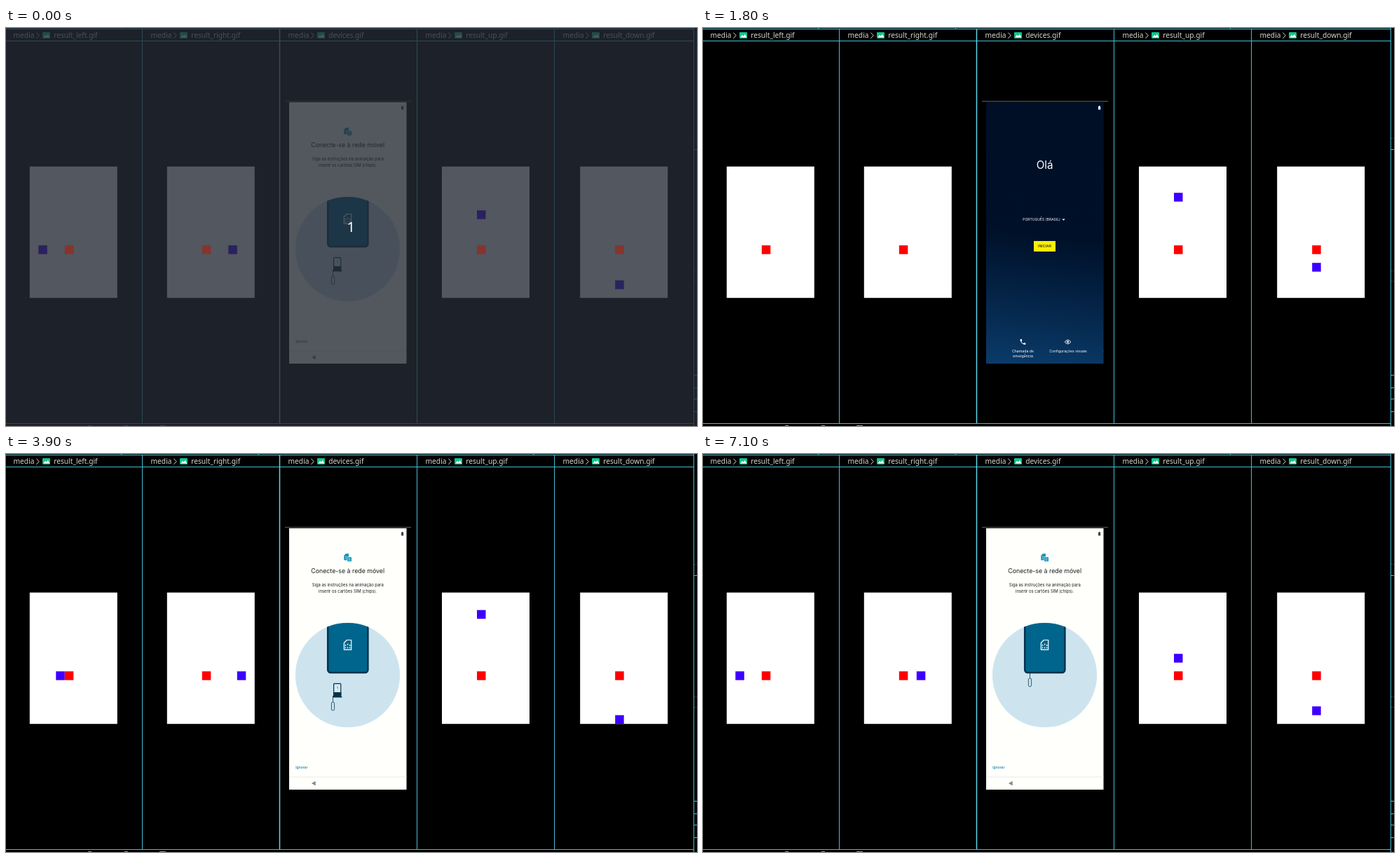
An HTML page for the animation above (7300 ms loop, 986 by 568 pixels).

```html
<!DOCTYPE html>
<html lang="pt">
<head>
<meta charset="utf-8">
<style>
  html, body { margin: 0; width: 100%; height: 100%; overflow: hidden; background: #000; }
  svg { display: block; width: 986px; height: 568px; }
  text { font-family: Inter, sans-serif; }
  .tab text, #count { font-family: "Noto Sans", "Open Sans", sans-serif; }
  .mid { text-anchor: middle; }
</style>
</head>
<body>
<svg viewBox="0 0 986 568" xmlns="http://www.w3.org/2000/svg">
  <defs>
    <linearGradient id="night" gradientUnits="userSpaceOnUse" x1="510" y1="106" x2="462" y2="483">
      <stop offset="0" stop-color="#000f26"/>
      <stop offset=".5" stop-color="#001028"/>
      <stop offset=".65" stop-color="#021c3b"/>
      <stop offset=".82" stop-color="#062a50"/>
      <stop offset="1" stop-color="#0a3b69"/>
    </linearGradient>
    <clipPath id="screen"><rect x="404" y="106" width="167.5" height="373"/></clipPath>
    <clipPath id="disc"><circle cx="487.5" cy="315.5" r="74.6"/></clipPath>
  </defs>
  <rect width="986" height="568"/>

  <g id="frame" stroke="#45bcd4" fill="none">
    <path d="M0 1.5H981M0 18.5H981M0 564.5H981M194.5 1V564M586.5 1V564M782.5 1V564M981.5 0V568"/>
    <path d="M390.5 1V564" stroke="#62d4ea" stroke-width="1.5"/>
    <path d="M164.5 0V1M360.5 0V1M752.5 0V1M982 173.5H986M982 495.5H986M982 513.5H986M982 529.5H986M982 547.5H986"/>
    <path d="M982 157.5H986M982 346.5H986M982 361.5H986" stroke="#8a2f35" stroke-dasharray="1 1"/>
    <path d="M117 567.5h5M169 567.5h5M219 567.5h9" stroke="#999"/>
  </g>
  <g id="tabs"></g>
  <g id="boards"></g>

  <path d="M398 104.7H578" stroke="#6a6664"/>
  <g clip-path="url(#screen)">
    <rect x="404" y="106" width="168" height="373" fill="#000f26"/>
    <g id="hello" fill="#fff">
      <rect x="403" y="106" width="169" height="373" fill="url(#night)"/>
      <text class="mid" x="487.6" y="201" font-size="15.2">Olá</text>
      <text x="456.2" y="275.4" font-size="5.05">PORTUGUÊS (BRASIL)</text>
      <path d="M512.3 272.4h4.4l-2.2 2.4z"/>
      <rect id="start" x="472" y="304" width="31" height="15"/>
      <text class="mid" x="487.5" y="313.4" font-size="5.2" font-weight="500" fill="#222">INICIAR</text>
      <path transform="translate(451.3 442.8) scale(.43)" d="M6.62 10.79c1.44 2.83 3.76 5.14 6.59 6.59l2.2-2.2c.27-.27.67-.36 1.02-.24 1.12.37 2.33.57 3.57.57.55 0 1 .45 1 1V20c0 .55-.45 1-1 1-9.39 0-17-7.61-17-17 0-.55.45-1 1-1h3.5c.55 0 1 .45 1 1 0 1.25.2 2.45.57 3.57.11.35.03.74-.25 1.02z"/>
      <path d="M516.4 448q4.1-5.6 8.4 0q-4.3 5.6-8.4 0z" fill="none" stroke="#fff"/>
      <circle cx="520.6" cy="448" r="1.4"/>
      <text class="mid" x="456.5" y="463" font-size="5.2">Chamada de</text>
      <text class="mid" x="456.5" y="469.8" font-size="5.2">emergência</text>
      <text class="mid" x="521" y="463" font-size="5.1">Configurações visuais</text>
    </g>
    <g id="sim" fill="#1c1c1c">
      <rect x="404" y="106" width="169" height="373" fill="#fffffc"/>
      <g fill="#1094b6">
        <path d="M482.3 145l2.6-2.8h4.1v4.2h-2.4v5.2h-4.3z"/>
        <path d="M487.2 147.2h5.8v6h-5.8z"/>
        <path d="M484 146.5h1.6M484 149h1.6M488.7 149.3h2.8M488.7 151.4h2.8" stroke="#fff" stroke-width=".7"/>
      </g>
      <text class="mid" x="487.7" y="170" font-size="8.8">Conecte-se à rede móvel</text>
      <text class="mid" x="487.8" y="189.2" font-size="5.9">Siga as instruções na animação para</text>
      <text class="mid" x="487.6" y="198.3" font-size="5.9">inserir os cartões SIM (chips).</text>
      <circle cx="487.5" cy="315.5" r="74.6" fill="#cde4ef"/>
      <g id="tool" stroke="#1c4a63" stroke-width=".9" fill="none">
        <path d="M466.5 0V9"/>
        <rect x="464.4" y="9" width="4.2" height="12" rx="2.1"/>
      </g>
      <g id="tray" fill="#06334a">
        <rect x="467.6" y="-17.4" width="10.2" height="18" rx="1" fill="#cde4ef" stroke="#06334a" stroke-width="1.2"/>
        <path d="M467 -5h11.4v6.5h-11.4zM466 1h13.4v1.6h-13.4z"/>
        <path d="M470 -14.5h5.5v7h-5.5z" fill="#e4f1f6"/>
        <text class="mid" x="472.8" y="-8.8" font-size="5">1</text>
      </g>
      <g clip-path="url(#disc)">
        <rect x="459.2" y="225" width="57.2" height="87" rx="4" fill="#00658c" stroke="#06334a" stroke-width="2.5"/>
      </g>
      <g stroke="#fff" fill="none">
        <path d="M482.4 269.5l4-4h6.3v13.8h-10.3z" stroke-width="1.2" stroke-linejoin="round"/>
        <path d="M484.5 272v2M487.6 270.8v2M490.6 272v2M484.5 275.4v2M487.6 275.4v2M490.6 275.4v2" stroke-width="1.3"/>
      </g>
      <text x="413.2" y="449" font-size="5" font-weight="500" fill="#0c7ca2">Ignorar</text>
      <path d="M404 461H572" stroke="#e4e4e1" stroke-width=".8"/>
    </g>
    <path id="back" d="M441.6 466.8v6.4l-5.6-3.2z" fill="#858585"/>
    <g id="battery">
      <rect x="564" y="111.8" width="3.2" height="4.8" rx=".6"/>
      <rect x="564.9" y="111" width="1.4" height="1"/>
    </g>
  </g>

  <rect id="shade" width="986" height="568" fill="rgb(38,42,52)" fill-opacity=".79"/>
  <g id="reds"></g>
  <text id="count" class="mid" x="492.3" y="291" font-size="20" fill="#fff">1</text>
</svg>
<script>
const $ = id => document.getElementById(id);
const CELL = 12.5, TOP = 197.7, COL = 4, ROW = 9, LOOP = 7300, DEVICE = 4000;

// reach: cells the blue square travels; phase: its position in the cycle at 800 ms
const boards = [
  { name: 'left',  x: 33.8,  dx: -1, dy: 0,  reach: 4, phase: 0.1 },
  { name: 'right', x: 229.8, dx: 1,  dy: 0,  reach: 5, phase: 0.4 },
  { name: 'up',    x: 622,   dx: 0,  dy: -1, reach: 9, phase: 9.5 },
  { name: 'down',  x: 819.2, dx: 0,  dy: 1,  reach: 5, phase: 5.735 }
];

function add(parent, tag, attrs) {
  const el = document.createElementNS('http://www.w3.org/2000/svg', tag);
  for (const k in attrs) el.setAttribute(k, attrs[k]);
  parent.appendChild(el);
  return el;
}
const show = (el, on) => el.setAttribute('visibility', on ? 'visible' : 'hidden');
const move = (el, x, y) => el.setAttribute('transform', `translate(${x} ${y})`);
const clamp = v => Math.min(1, Math.max(0, v));
const mix = (a, b, p) => a + (b - a) * p;

['result_left', 'result_right', 'devices', 'result_up', 'result_down'].forEach((name, i) => {
  const tab = add($('tabs'), 'g', { class: 'tab', transform: `translate(${196 * i} 0)`, 'font-size': 10.2, fill: '#d8d4c8' });
  add(tab, 'text', { x: 10.6, y: 14.2 }).textContent = 'media';
  add(tab, 'path', { d: 'M43.4 6.6l3.8 4.1-3.8 4.1', fill: 'none', stroke: '#d8d4c8' });
  add(tab, 'rect', { x: 52, y: 6, width: 11, height: 8.8, rx: 1, fill: '#12c48b' });
  add(tab, 'path', { d: 'M53.4 13.4l2.6-3.6 1.8 2 2-3 2.6 4.6z', fill: '#fff' });
  add(tab, 'text', { x: 68.2, y: 14.2 }).textContent = name + '.gif';
});

for (const b of boards) {
  const square = { width: CELL, height: CELL };
  add($('boards'), 'rect', { x: b.x, y: TOP, width: 10 * CELL, height: 15 * CELL, fill: '#fff' });
  b.blue = add($('boards'), 'rect', { ...square, fill: '#3d00ff' });
  add($('reds'), 'rect', { ...square, x: b.x + COL * CELL, y: TOP + ROW * CELL });
}

function drawBoards(t) {
  for (const b of boards) {
    const cycle = b.reach + 2;
    const step = Math.floor(4.95 * (t - 800) / 1000 + b.phase);
    const dist = b.reach - ((step % cycle) + cycle) % cycle;
    show(b.blue, dist > 0);
    move(b.blue, b.x + (COL + b.dx * dist) * CELL, TOP + (ROW + b.dy * dist) * CELL);
  }
}

function drawDevice(t) {
  const u = (t - 400 + DEVICE) % DEVICE + 400;
  const slide = 167.5 * Math.pow(1 - clamp((u - 2375.5) / 400), 2.46);
  move($('sim'), slide, 0);
  move($('hello'), slide - 167.5, 0);
  $('start').setAttribute('fill', u < 2200 ? '#fbf000' : '#fcc400');
  $('battery').setAttribute('fill', u < 2450 ? '#fff' : '#444');
  show($('back'), u >= 2700);

  const out = clamp((u - 3250) / 500);
  const top = mix(mix(322, 311, clamp((u - 2500) / 400)), 345, out * out * (3 - 2 * out));
  move($('tool'), 0, top);
  move($('tray'), 0, top);
  show($('tray'), out > 0);
}

function draw(ms) {
  const tick = Math.min(71, Math.floor(ms / 100));
  const intro = tick === 0;
  const t = intro ? -100 : tick * 100;
  show($('shade'), intro);
  show($('count'), intro);
  $('reds').setAttribute('fill', intro ? '#85352d' : '#f00');
  drawBoards(t);
  drawDevice(t);
}

const began = performance.now();
function loop() {
  draw((performance.now() - began) % LOOP);
  requestAnimationFrame(loop);
}
draw(0);
requestAnimationFrame(loop);
</script>
</body>
</html>
```
